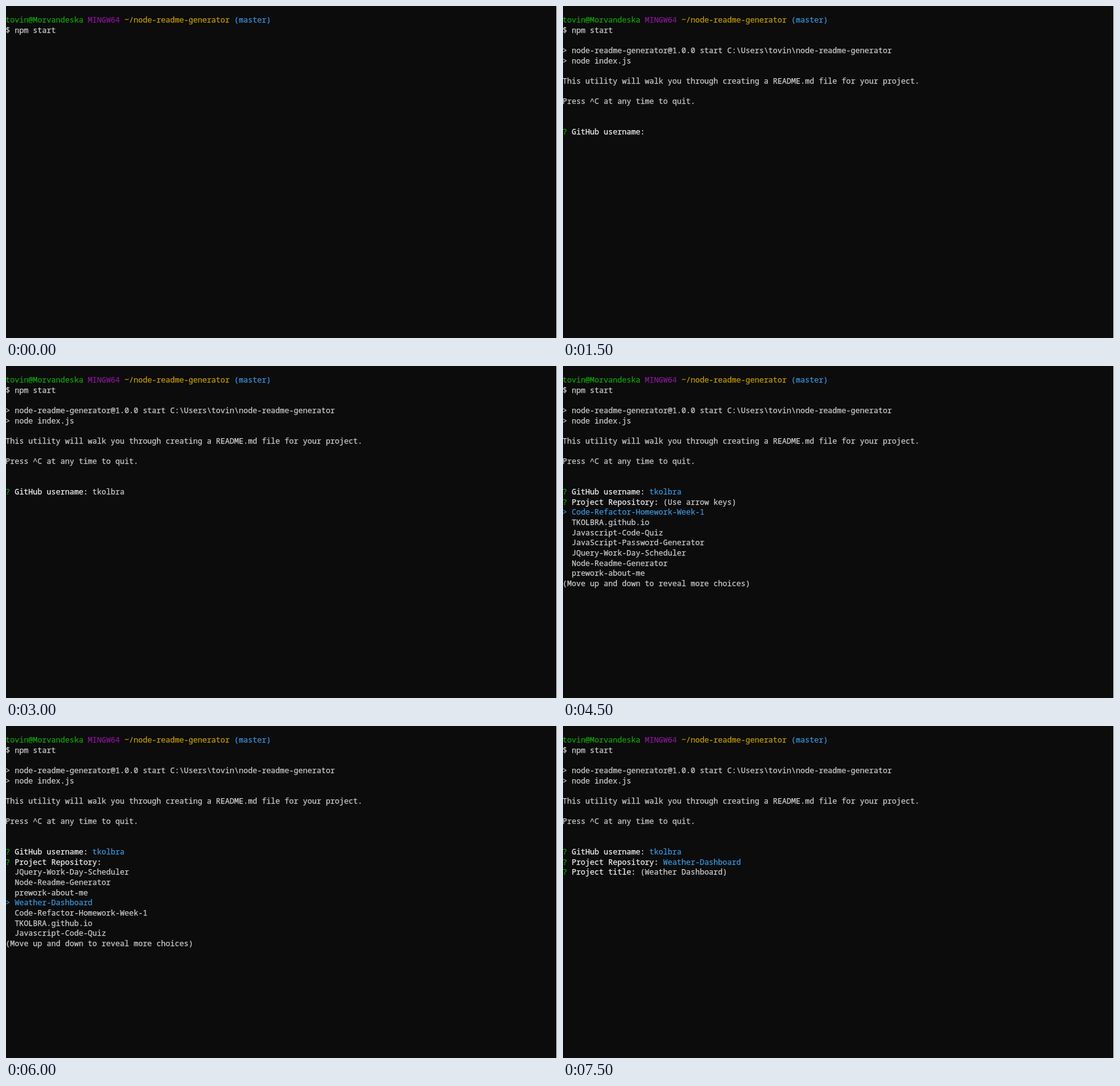
Recreate the animation shown at these times as an HTML page. Size 901 px wide and 543 px high, loop 8000 ms.

```html
<!DOCTYPE html>
<html lang="en">
<head>
<meta charset="utf-8">
<title>README generator</title>
<style>
  html, body { margin: 0; width: 100%; height: 100%; overflow: hidden; background: #0c0c0c; }
  svg { display: block; width: 901px; height: 543px; }
  text { font: 12.48px "Noto Sans Mono", monospace; white-space: pre; font-variant-ligatures: none; stroke-width: .25px; }
</style>
</head>
<body>
<svg id="screen" viewBox="0 0 901 543">
  <rect x="900" width="1" height="543" fill="#fff"/>
</svg>
<script>
const LOOP = 8000, STEP = 1500;
const LEFT = -0.8, BASELINE = 27, LINE_HEIGHT = 16.65;
const COLORS = {
  text: '#cccccc', white: '#f2f2f2', green: '#13a10e',
  purple: '#881798', yellow: '#c19c00', blue: '#3a96dd'
};

// Each line is a list of [color, text] runs.
const plain = s => [['text', s]];
const ask = (label, color = 'text', answer = '') =>
  [['green', '? '], ['white', label + ' '], [color, answer]];
const menu = (items, chosen) => [
  ...items.map(s => s === chosen ? [['blue', '> ' + s]] : plain('  ' + s)),
  plain('(Move up and down to reveal more choices)')
];

const user = 'tovin', account = 'tkolbra';
const repos = [
  'Code-Refactor-Homework-Week-1', account.toUpperCase() + '.github.io',
  'Javascript-Code-Quiz', 'JavaScript-Password-Generator',
  'JQuery-Work-Day-Scheduler', 'Node-Readme-Generator',
  'prework-about-me', 'Weather-Dashboard'
];
const visibleRepos = first =>
  Array.from({ length: 7 }, (_, i) => repos[(first + i) % repos.length]);

const prompt = [
  [['green', user + '@Morvandeska '], ['purple', 'MINGW64 '],
   ['yellow', '~/node-readme-generator '], ['blue', '(master)']],
  plain('$ npm start')
];
const intro = [
  ...prompt,
  [],
  plain(`> node-readme-generator@1.0.0 start C:\\Users\\${user}\\node-readme-generator`),
  plain('> node index.js'),
  [],
  plain('This utility will walk you through creating a README.md file for your project.'),
  [],
  plain('Press ^C at any time to quit.'),
  [], []
];
const nameLabel = 'GitHub username:', repoLabel = 'Project Repository:';
const named = [...intro, ask(nameLabel, 'blue', account)];

const scenes = [
  prompt,
  [...intro, ask(nameLabel)],
  [...intro, ask(nameLabel, 'text', account)],
  [...named, ask(repoLabel, 'text', '(Use arrow keys)'), ...menu(visibleRepos(0), repos[0])],
  [...named, ask(repoLabel), ...menu(visibleRepos(4), repos[7])],
  [...named, ask(repoLabel, 'blue', repos[7]), ask('Project title:', 'text', '(Weather Dashboard)')]
];

const screen = document.getElementById('screen');

function add(parent, tag, attrs = {}) {
  const el = document.createElementNS('http://www.w3.org/2000/svg', tag);
  for (const key in attrs) el.setAttribute(key, attrs[key]);
  return parent.appendChild(el);
}

const groups = scenes.map(lines => {
  const group = add(screen, 'g', { visibility: 'hidden' });
  lines.forEach((runs, row) => {
    const line = add(group, 'text', { x: LEFT, y: BASELINE + row * LINE_HEIGHT });
    for (const [color, s] of runs) {
      add(line, 'tspan', { fill: COLORS[color], stroke: COLORS[color] }).textContent = s;
    }
  });
  return group;
});

const start = performance.now();
function draw() {
  const current = Math.floor((performance.now() - start) % LOOP / STEP);
  groups.forEach((g, i) => g.setAttribute('visibility', i === current ? 'visible' : 'hidden'));
  requestAnimationFrame(draw);
}
draw();
</script>
</body>
</html>
```
